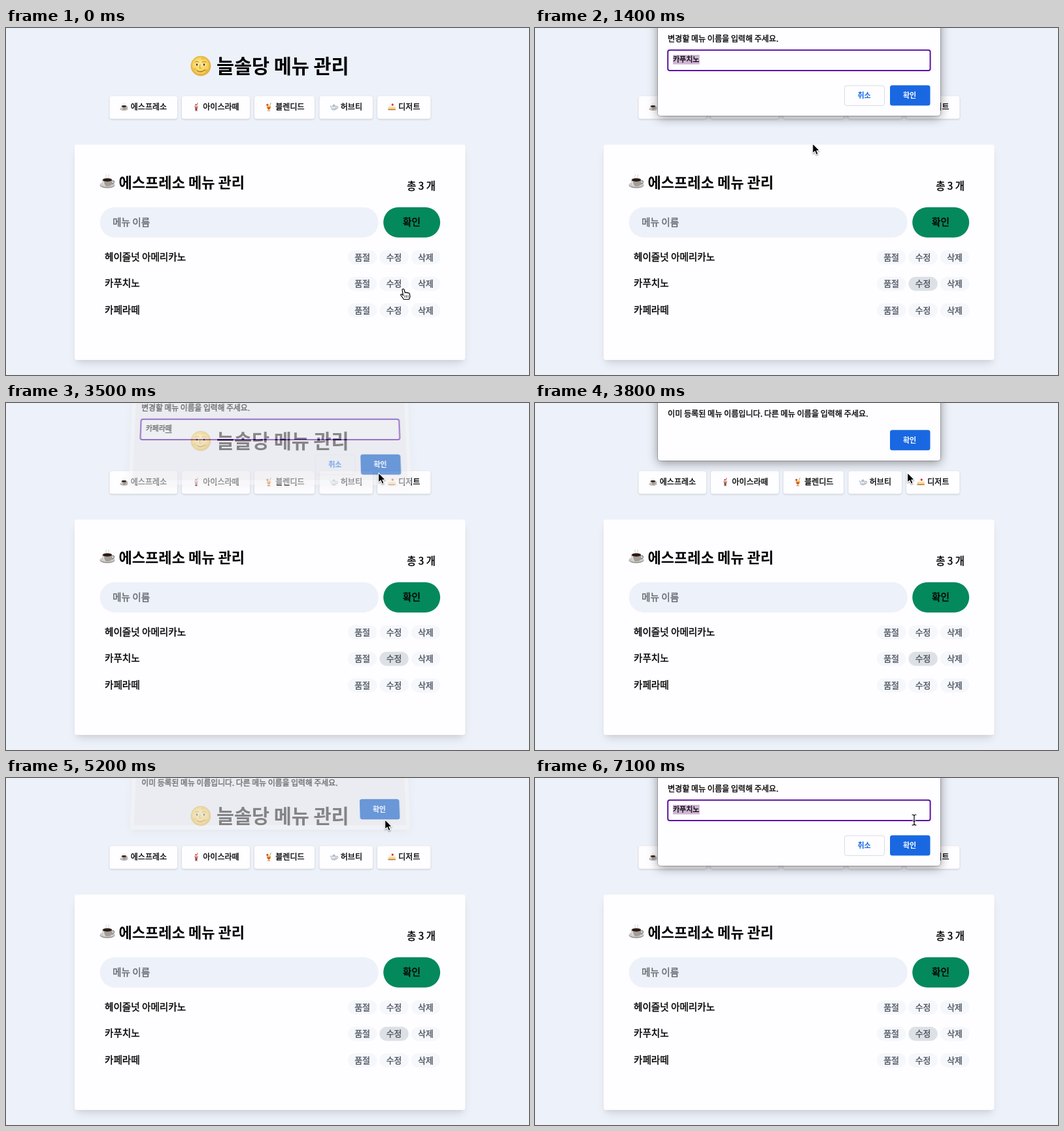
These frames come from a looping animation (800x530 px, 7.2 s). An HTML page with a canvas:

```html
<!DOCTYPE html>
<html lang="ko">
<head>
<meta charset="utf-8">
<title>메뉴 관리</title>
<style>
html, body { margin: 0; width: 100%; height: 100%; overflow: hidden; background: #edf1f9; }
canvas { display: block; width: 800px; height: 530px; }
</style>
</head>
<body>
<canvas id="stage" width="800" height="530"></canvas>
<script>
const LOOP = 7200, STEP = 100;
const FONT = '"Noto Sans CJK KR", "Noto Sans CJK", "Noto Sans", sans-serif';
const BG = '#edf1f9', PAPER = '#fefdff', BLUE = '#1968e2';
const stage = document.getElementById('stage').getContext('2d');
const layer = document.createElement('canvas');
layer.width = 800;
layer.height = 180;
const sheet = layer.getContext('2d');
let g = stage;

function box(x, y, w, h, r, fill) {
  g.beginPath();
  g.roundRect(x, y, w, h, r);
  g.fillStyle = fill;
  g.fill();
}

function outline(x, y, w, h, r, color, width) {
  g.beginPath();
  g.roundRect(x, y, w, h, r);
  g.strokeStyle = color;
  g.lineWidth = width;
  g.stroke();
}

function shadowBox(x, y, w, h, r, fill, dy, blur, alpha) {
  g.save();
  g.shadowColor = `rgba(0,0,0,${alpha})`;
  g.shadowOffsetY = dy;
  g.shadowBlur = blur;
  box(x, y, w, h, r, fill);
  g.restore();
}

// cy is the middle of the Hangul glyphs; weight 500 is a regular cut with a hairline stroke
function text(s, x, cy, size, color = '#000', weight = 400, align = 'left') {
  const y = cy + size * 0.38;
  g.font = `${weight === 700 ? 700 : 400} ${size}px ${FONT}`;
  g.textAlign = align;
  g.fillStyle = g.strokeStyle = color;
  g.fillText(s, x, y);
  if (weight !== 500) return;
  g.lineWidth = size * 0.028;
  g.lineJoin = 'round';
  g.strokeText(s, x, y);
}

function oval(x, y, rx, ry, fill) {
  g.beginPath();
  g.ellipse(x, y, rx, ry, 0, 0, Math.PI * 2);
  g.fillStyle = fill;
  g.fill();
}

function path(d, fill, stroke, width = 1) {
  const p = new Path2D(d);
  if (fill) { g.fillStyle = fill; g.fill(p); }
  if (stroke) {
    g.strokeStyle = stroke;
    g.lineWidth = width;
    g.lineJoin = g.lineCap = 'round';
    g.stroke(p);
  }
}

function at(x, y, scale, draw) {
  g.save();
  g.translate(x, y);
  g.scale(scale, scale);
  draw();
  g.restore();
}

// Icons live in a box of about 24 units around the origin
function coffee() {
  oval(0, 5, 11.5, 4.6, '#8f8c89');
  oval(0, 4.2, 11.2, 3.9, '#cfccc8');
  path('M6-1C12-4 12 4 5 3', null, '#85827f', 1.6);
  path('M-8-3C-8 4-5 7 0 7S8 4 8-3Z', '#a19d99');
  path('M-8-3C-8 4-5 7-2 7C-5 4-5 0-5-3Z', '#dedbd7');
  oval(0, -3, 8, 3.2, '#dcd8d3');
  oval(0, -2.8, 7, 2.6, '#2c1a15');
  path('M-2-7C-4-8 0-9-2-11M2-7C0-8 4-9 2-11', null, 'rgba(170,172,178,.6)', 1);
}

function icedCup() {
  path('M1-4L4-12', null, '#c3362e', 1.8);
  path('M-5-4H5L2 10H-2Z', '#8f332f');
  path('M-4 0H4L3 4H-3Z', '#c9746a');
  oval(0, -4, 5, 3, '#eadbd6');
  oval(-1, -7, 2.4, 2.2, '#cc2c32');
  box(-4, 9, 8, 2.5, 1, '#a8a4aa');
}

function blended() {
  path('M2-4L6-12', null, '#45a354', 1.8);
  path('M-6-5C-7 2-4 5-2 6V9H2V6C5 4 7 0 6-5Z', '#efb83d');
  path('M-5 0C-3 5-2 6 0 6S5 4 5 0Z', '#d84a35');
  oval(-4, -7, 3.2, 3.2, '#d8473b');
  oval(1, -6, 3, 2, '#f6e8bb');
  oval(0, 10, 5, 1.8, '#c9b79d');
}

function teapot() {
  path('M7-2C14-6 13 6 6 5', null, '#a9b1bd', 2);
  path('M-5 4C-9 3-9-2-12-4L-9-5C-6-2-5-2-3-2Z', '#bac2cc');
  oval(0, 2, 8.5, 7, '#bac2cd');
  oval(-1, 0, 6.5, 4.5, '#e2e6ec');
  oval(0, -4, 5, 2, '#a9b1bd');
  oval(0, -7, 1.8, 1.6, '#929cab');
}

function cake() {
  oval(0, 7, 11.5, 3, '#d9d7d8');
  path('M-10-1L3-6L11-1V7H-10Z', '#e9ae4d');
  path('M-10-1L3-6L11-1V1H-10Z', '#fff0d0');
  path('M-10 3H11', null, '#fff0cf', 1.8);
  path('M-10 7H11', null, '#ae6a2a', 1.5);
  path('M0-6C-2-9 1-12 4-10S5-5 3-4Z', '#d9342f');
}

function moon() {
  const glow = g.createRadialGradient(-3, -4, 2, 0, 0, 15.5);
  glow.addColorStop(0, '#ffe78a');
  glow.addColorStop(0.7, '#f8d257');
  glow.addColorStop(1, '#d9a637');
  oval(0, 0, 15.3, 15.3, glow);
  oval(-9, 5, 2.3, 1.8, 'rgba(211,158,48,.45)');
  oval(8, 7, 2.6, 2, 'rgba(211,158,48,.45)');
  oval(3, -11, 2.5, 1.4, 'rgba(211,158,48,.4)');
  for (const x of [-6, 5]) {
    oval(x, -2, 3, 2, '#fff3c5');
    oval(x, -2, 1.5, 1.8, '#56421d');
    path(`M${x - 3}-6Q${x}-8 ${x + 3}-6`, null, '#b88428', 1);
  }
  path('M-1-2L-2 3Q0 4 1 3', null, '#c4912e', 1);
  path('M-6 7Q0 11 6 6', null, '#a87122', 1.3);
}

const tabs = [
  [158.5, 103.5, '에스프레소', coffee],
  [269, 104, '아이스라떼', icedCup],
  [380, 92, '블렌디드', blended],
  [479.5, 81.5, '허브티', teapot],
  [568, 81.5, '디저트', cake],
];
const rows = ['헤이즐넛 아메리카노', '카푸치노', '카페라떼'];
const actions = ['품절', '수정', '삭제'];

function drawPage(hover) {
  box(0, 0, 800, 530, 0, BG);
  at(298, 58, 1, moon);
  text('늘솔당 메뉴 관리', 322, 57.7, 29.4, '#000', 700);

  for (const [x, w, label, icon] of tabs) {
    shadowBox(x, 104, w, 34.7, 3.5, PAPER, 1, 3, 0.17);
    at(x + 22, 121, 0.52, icon);
    text(label, x + 32.3, 120.8, 12, '#000', 500);
  }

  // two soft shadows with a negative spread
  shadowBox(108, 181, 591.5, 323, 3.5, PAPER, 9, 14, 0.1);
  shadowBox(107, 180, 593.5, 325, 3.5, PAPER, 4, 6, 0.05);
  box(105, 178, 597.5, 329, 3.5, PAPER);
  at(155, 235, 1, coffee);
  text('에스프레소 메뉴 관리', 172.5, 235.3, 22.05, '#000', 700);
  text('총 3 개', 657, 241, 15.4, '#000', 500, 'right');
  box(143.7, 273.7, 426, 46.2, 23.1, BG);
  text('메뉴 이름', 163, 296.2, 14.7, '#676b72', 500);
  box(577.2, 273.7, 87, 46.2, 23.1, '#04895c');
  text('확인', 620.5, 296.2, 14.7, '#000', 500, 'center');

  rows.forEach((name, i) => {
    const y = 350 + i * 40.5;
    text(name, 151, y - 0.7, 14.6, '#000', 500);
    actions.forEach((label, j) => {
      const x = 523 + j * 48.5;
      box(x, y - 10.6, 44.2, 21.6, 10.8, '#f5f7fb');
      if (i === 1 && j === 1 && hover > 0) {
        g.globalAlpha = hover;
        box(x, y - 10.6, 44.2, 21.6, 10.8, '#dde1e5');
        g.globalAlpha = 1;
      }
      text(label, x + 22.1, y, 12.9, '#4c5461', 500, 'center');
    });
  });
}

function panel(bottom, fading) {
  shadowBox(188, -40, 432, bottom + 40, 4, fading ? '#f2f2f4' : PAPER, 3, 16, fading ? 0.08 : 0.42);
  if (fading) box(194, -40, 420, bottom + 33, 2, '#e9e9eb');
  else outline(187.5, -40.5, 433, bottom + 41, 4.5, 'rgba(0,0,0,.2)', 1);
}

function okButton(y, fading) {
  box(543, y, 61.5, 31, 3.5, fading ? '#0753c0' : BLUE);
  text('확인', 573, y + 15.3, 11, '#fff', 700, 'center');
}

function drawPrompt(field, fading) {
  panel(134, fading);
  text('변경할 메뉴 이름을 입력해 주세요.', 203, 16.3, 12.05, '#000', 500);
  box(203, 33.5, 402, 31.5, 3, fading ? '#eeeef0' : PAPER);
  outline(203.2, 33.7, 401.4, 31.2, 3, '#5a12a6', 2);
  if (field.selected) box(211, 41, 40.7, 14.5, 0, '#ceb4d4');
  text(field.value, 211, 48.3, 11, '#000', 500);
  const end = 211 + g.measureText(field.value).width;
  if (field.composing) box(end - 10, 54, 10, 1, 0, '#000');
  if (field.caret) box(end + 0.5, 41.5, 1, 14, 0, '#000');
  if (!fading) box(473, 87.5, 62, 31, 3.5, PAPER);
  outline(473.5, 88, 61, 30.5, 3.5, '#dadde3', 1);
  text('취소', 503.5, 103, 11, BLUE, 700, 'center');
  okButton(87.5, fading);
}

function drawAlert(fading) {
  panel(88, fading);
  text('이미 등록된 메뉴 이름입니다. 다른 메뉴 이름을 입력해 주세요.', 203, 16.3, 12.1, '#000', 500);
  okButton(41.3, fading);
}

// While it opens or closes, a dialog tilts back towards the top edge
function drawDialog(draw, fading) {
  if (!fading) return draw(false);
  sheet.clearRect(0, 0, 800, 180);
  g = sheet;
  draw(true);
  g = stage;
  g.globalAlpha = 0.57;
  for (let y = 0; y < 180; y++) {
    const s = 0.976 + 0.0002 * y;
    g.drawImage(layer, 0, y, 800, 1, 404 * (1 - s), y - 9, 800 * s, 1);
  }
  g.globalAlpha = 1;
}

const typed = [
  [1700, 'ㅋ'], [1800, '카'], [1900, '카ㅍ'], [2000, '카페'],
  [2100, '카펠'], [2200, '카페라'], [2400, '카페라ㄸ'], [2500, '카페라떼'],
];

function fieldAt(t) {
  const last = typed.filter(([from]) => t >= from).pop();
  if (!last || t >= 5200) return { value: '카푸치노', selected: true };
  const blink = t < 2700 || Math.floor((t - 2700) / 500) % 2 === 0;
  return { value: last[1], composing: true, caret: blink && t < 3500 };
}

// time, x, y of the pointer's hot spot
const route = [
  [0, 607.5, 398.5], [100, 607.5, 398.5], [400, 604, 391], [600, 604, 391],
  [1300, 425, 177], [2700, 425, 177], [3300, 570, 107], [4200, 570, 107],
  [4600, 582, 65], [5000, 582, 65], [5100, 580, 64], [LOOP, 580, 64],
];

function pointerAt(t) {
  const i = Math.max(1, route.findIndex(([time]) => time >= t));
  const [t0, x0, y0] = route[i - 1], [t1, x1, y1] = route[i];
  const u = (t - t0) / (t1 - t0), e = u * u * (3 - 2 * u);
  return [x0 + (x1 - x0) * e, y0 + (y1 - y0) * e];
}

function hand() {
  path('M-1.5 1Q0-1 1.5 1L3 6Q4 4.5 5.3 6Q6.5 5 7.6 6.4Q9.5 5.8 10 8L10.5 12L9 16H1L-3 10.5Q-4.5 8.5-2.8 8Q-1.5 8 0 10Z',
    '#fff', '#000', 1.2);
  path('M2.5 10V13M5 10V13M7.5 10V13', null, '#000', 0.8);
}

function arrow() {
  g.save();
  g.shadowColor = 'rgba(0,0,0,.35)';
  g.shadowBlur = 2;
  g.shadowOffsetY = 1;
  path('M0 0V14.2L3.2 11.3L5.5 16.5L8 15.4L5.8 10.3H10Z', '#000', '#fff', 1.3);
  g.restore();
  path('M.4 1V13L3.4 10.3L5.8 15.7L7.2 15.1L4.9 9.8H9Z', '#000');
}

function beam() {
  const d = 'M-3-8Q0-8 0-6Q0-8 3-8M0-6V6M-3 8Q0 8 0 6Q0 8 3 8M-1.5 2H1.5';
  path(d, null, '#fff', 2.6);
  path(d, null, '#000', 1.2);
}

function draw(t) {
  drawPage(Math.min(1, Math.max(0, t / 400)));
  const prompt = fading => drawPrompt(fieldAt(t), fading);
  if (t >= 600 && t < 3600) drawDialog(prompt, t < 700 || t >= 3500);
  else if (t >= 3700 && t < 5300) drawDialog(drawAlert, t < 3800 || t >= 5200);
  else if (t >= 5300) drawDialog(prompt, t < 5400);
  const [x, y] = pointerAt(t);
  at(x, y, 1, t < 600 ? hand : t < 5500 ? arrow : beam);
}

const start = performance.now();
function tick(now) {
  const t = Math.max(0, now - start) % LOOP;
  draw(Math.floor(t / STEP) * STEP);
  requestAnimationFrame(tick);
}
draw(0);
requestAnimationFrame(tick);
</script>
</body>
</html>
```
